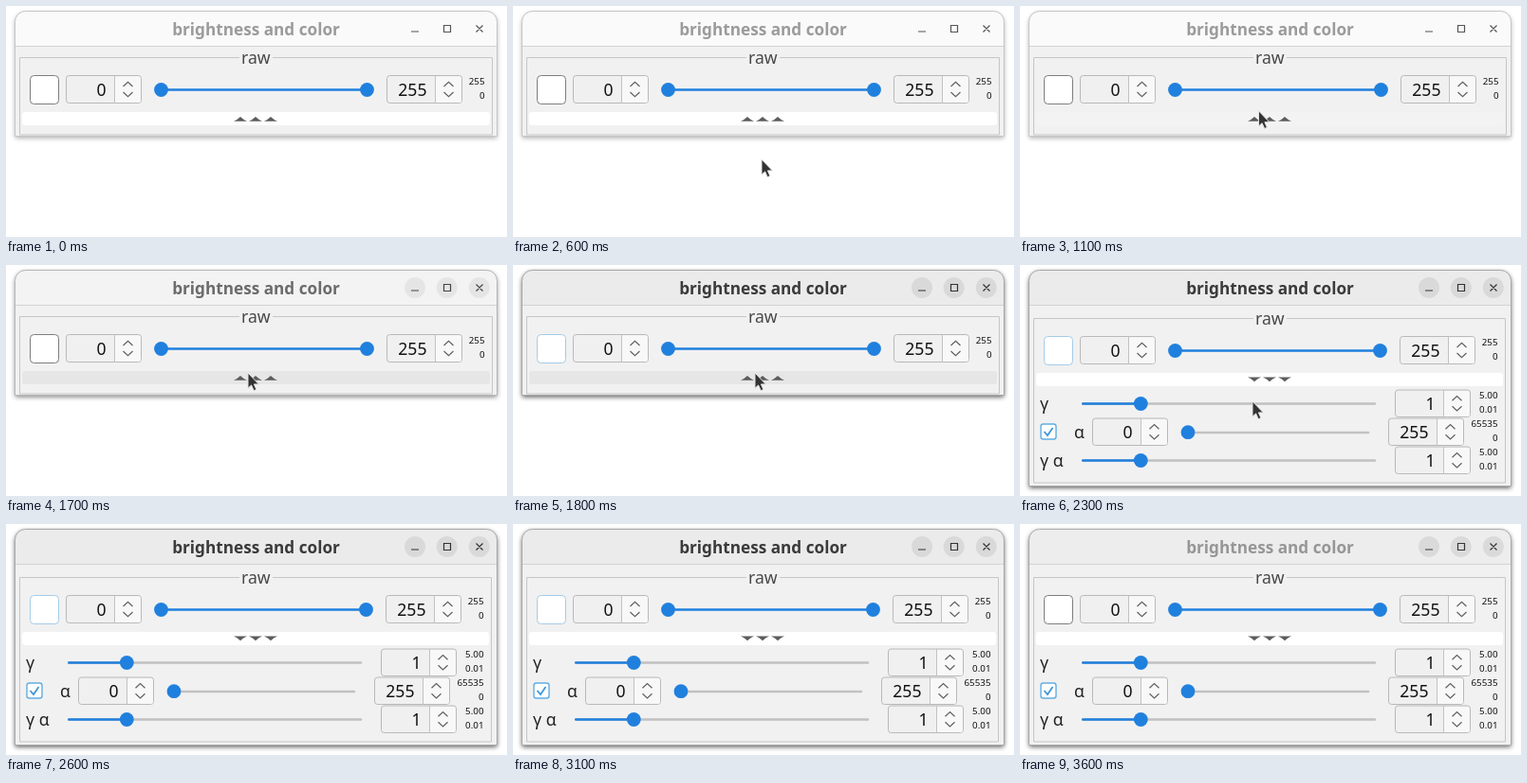
These frames come from a looping animation (528x244 px, 3.7 s). An HTML page:

```html
<!DOCTYPE html>
<html lang="en">
<head>
<meta charset="utf-8">
<title>brightness and color</title>
<style>
  html, body { margin: 0; width: 100%; height: 100%; overflow: hidden; background: #fff; }
  svg { display: block; font-family: "Noto Sans", sans-serif; font-size: 17.6px; }
  text { fill: #222; }
  .title { font-size: 17.2px; font-weight: 700; text-anchor: middle; }
  .group { fill: #484848; }
  .small { font-size: 9.8px; text-anchor: end; fill: #111; }
  .num { text-anchor: end; fill: #111; }
  .icon { fill: none; stroke-width: 1.2; }
</style>
</head>
<body>
<svg id="stage" width="528" height="244" viewBox="0 0 528 244">
  <defs>
    <filter id="soft" x="-10%" y="-20%" width="120%" height="140%">
      <feGaussianBlur stdDeviation="2.9"/>
    </filter>
  </defs>
  <path id="shadow" filter="url(#soft)" transform="translate(0 2)"/>
  <path id="frame" fill="#f1f1f1"/>
  <path id="head" d="M10 42V16.5A10.5 10.5 0 0 1 20.5 6H506.5A10.5 10.5 0 0 1 517 16.5V42Z"/>
  <path d="M10 42.5H517" stroke="#d2d2d2"/>
  <path id="outline" fill="none" stroke="#b9b9b9"/>
  <text id="title" class="title" x="263.5" y="31">brightness and color</text>
  <g id="discs" fill="#d9d9d9">
    <circle cx="431" cy="24" r="11"/><circle cx="464.7" cy="24" r="11"/><circle cx="498.8" cy="24" r="11"/>
  </g>
  <path id="icons" class="icon" d="M427 27H435M461.5 20.5H468.5V27.5H461.5ZM495.5 20.5L502.5 27.5M502.5 20.5L495.5 27.5"/>
  <g id="views"></g>
  <path id="cursor" d="M0 0V16.2L3.6 12.9L6.2 18.7L8.9 17.5L6.4 11.9H11.4Z" fill="#333" stroke="#e4e4e4" stroke-width="1" stroke-linejoin="round"/>
</svg>
<script>
const BLUE = '#2080de', LOOP = 3700, STEP = 100;
const $ = id => document.getElementById(id);
const mix = (a, b, k) => a + (b - a) * k;
const gray = v => { v = Math.round(v); return `rgb(${v},${v},${v})`; };

const label = (x, y, s, cls = '') => `<text x="${x}" y="${y}" class="${cls}">${s}</text>`;

function spin(x, y, w, h, value) {
  const sep = x + w - 28, a = x + w - 14, m = y + h / 2;
  return `<rect x="${x}" y="${y}" width="${w}" height="${h}" rx="3" fill="#f0f0f0" stroke="#b9b9b9"/>
    <path d="M${sep} ${y + 1}H${x + w - 3}q2.5 0 2.5 2.5V${y + h - 3}q0 2.5 -2.5 2.5H${sep}Z" fill="#f8f8f8"/>
    <path d="M${sep} ${y}V${y + h}" stroke="#c2c2c2"/>
    <path class="icon" stroke="#606060" d="M${a - 5} ${m - 3}l5 -4.6l5 4.6M${a - 5} ${m + 3}l5 4.6l5 -4.6"/>`
    + label(sep - 9, m + 6.8, value, 'num');
}

const line = (x1, x2, y, color) =>
  `<path d="M${x1} ${y}H${x2}" stroke="${color}" stroke-width="2.5" stroke-linecap="round"/>`;
const knob = (x, y) => `<circle cx="${x}" cy="${y}" r="7.4" fill="${BLUE}"/>`;
const slider = (x1, x2, at, y) => line(x1, x2, y, '#c1c1c1') + line(x1, at, y, BLUE) + knob(at, y);
const limits = (x, y, hi, lo) => label(x, y, hi, 'small') + label(x, y + 15, lo, 'small');

function gammaRow(y, name) {
  return label(21, y + 6.8, name) + slider(66.3, 374, 127.3, y)
    + spin(395.5, y - 14.5, 79, 28.5, '1') + limits(503.5, y - 6, '5.00', '0.01');
}

// The raw range row and the fold bar; dy and dx shift it when unfolded.
function rawPart(dy, dx, bottom, open) {
  const y = 88.5 + dy, right = 512.5 - dx;
  const tri = [247, 263, 279].map(x => open
    ? `M${x - 7} 118.5H${x + 7}Q${x + 3} 120 ${x} 123.3Q${x - 3} 120 ${x - 7} 118.5Z`
    : `M${x - 7} 121.8H${x + 7}Q${x + 3} 120 ${x} 117Q${x - 3} 120 ${x - 7} 121.8Z`).join('');
  return `<path d="M246 ${54.5 + dy}H14.5V${bottom}H${right}V${54.5 + dy}H281" fill="none" stroke="#c6c6c6"/>`
    + label(248, 61 + dy, 'raw', 'group')
    + `<rect class="swatch" x="25.5" y="${y - 15}" width="30" height="30" rx="4" fill="#fff"/>`
    + spin(63.5, y - 15, 79, 29, '0')
    + line(163, 380 - dx, y, BLUE) + knob(163.5, y) + knob(380.5 - dx, y)
    + spin(401.5 - dx, y - 15, 79, 29, '255')
    + limits(504.5 - dx, 82.7 + dy, '255', '0')
    + `<rect class="bar" x="17" y="${112 + dy}" width="${493 - dx}" height="14" rx="3"/>
       <path d="${tri}" fill="#5c5c5c"/>`;
}

const alphaRow = `<rect x="22" y="168" width="16" height="16" rx="2.5" fill="#fff" stroke="#62aee2" stroke-width="1.4"/>
  <path d="M25.5 176L29 180L34.5 172" fill="none" stroke="#3f96da" stroke-width="1.8"/>`
  + label(57, 183.3, 'α') + spin(76.5, 162, 79, 28.5, '0')
  + line(177, 367, 177, '#c1c1c1') + knob(177, 176.7)
  + spin(388.5, 162, 79, 28.5, '255') + limits(503.5, 171, '65535', '0');

$('views').innerHTML = `<g id="folded">${rawPart(0, 0, 136, false)}</g>
  <g id="open">${rawPart(2, 1, 230, true)}${gammaRow(146.5, 'γ')}${alphaRow}${gammaRow(206.5, 'γ α')}</g>`;

// Keys are [time, ...values], linear in between.
function at(keys, t) {
  let i = 0;
  while (i < keys.length - 2 && t > keys[i + 1][0]) i++;
  const a = keys[i], b = keys[i + 1];
  const k = Math.min(1, Math.max(0, (t - a[0]) / (b[0] - a[0])));
  return a.slice(1).map((v, n) => mix(v, b[n + 1], k));
}

const PATH = [[600, 262, 162], [700, 257, 136], [800, 254, 122], [900, 252, 114], [1100, 251.5, 110.8],
  [1300, 252, 111.5], [1500, 255, 114], [1800, 255, 114], [1900, 254, 114.5], [2100, 253.5, 116],
  [2200, 251, 126], [2300, 245, 144], [2400, 237, 173], [2500, 229, 203]];
const FOCUS = [[1600, 0], [1800, 1], [3500, 1], [3600, 0.9]];
const TITLE = [[1600, 155], [1800, 58], [3400, 58], [3500, 105], [3600, 150]];
const BAR = [[700, 255], [900, 243], [1600, 243], [1700, 230], [1800, 230], [1900, 244], [2100, 244], [2300, 255]];

function draw(t) {
  const open = t >= 1900, focus = at(FOCUS, t)[0], bottom = open ? 233.5 : 137.5;
  const shape = `M9.5 ${bottom}V16.5A11 11 0 0 1 20.5 5.5H506.5A11 11 0 0 1 517.5 16.5V${bottom}Z`;
  for (const id of ['frame', 'outline', 'shadow']) $(id).setAttribute('d', shape);
  $('shadow').setAttribute('opacity', mix(0.32, 0.64, focus));
  $('outline').setAttribute('stroke', gray(mix(198, 168, focus)));
  $('head').setAttribute('fill', gray(mix(250, 235, focus)));
  $('title').style.fill = gray(at(TITLE, t)[0]);
  $('discs').setAttribute('opacity', focus);
  $('icons').setAttribute('stroke', gray(mix(85, 50, focus)));
  $('folded').style.display = open ? 'none' : '';
  $('open').style.display = open ? '' : 'none';
  const edge = t >= 1800 && t < 3500 ? '#a3cce8' : '#7d7d7d';
  document.querySelectorAll('.swatch').forEach(e => e.setAttribute('stroke', edge));
  document.querySelectorAll('.bar').forEach(e => e.setAttribute('fill', gray(at(BAR, t)[0])));
  const [x, y] = at(PATH, t);
  $('cursor').style.display = t >= 600 && t < 2600 ? '' : 'none';
  $('cursor').setAttribute('transform', `translate(${x} ${y})`);
}

let start = null;
function tick(now) {
  if (start === null) start = now;
  draw(Math.floor((now - start) % LOOP / STEP) * STEP);
  requestAnimationFrame(tick);
}
draw(0);
requestAnimationFrame(tick);
</script>
</body>
</html>
```
